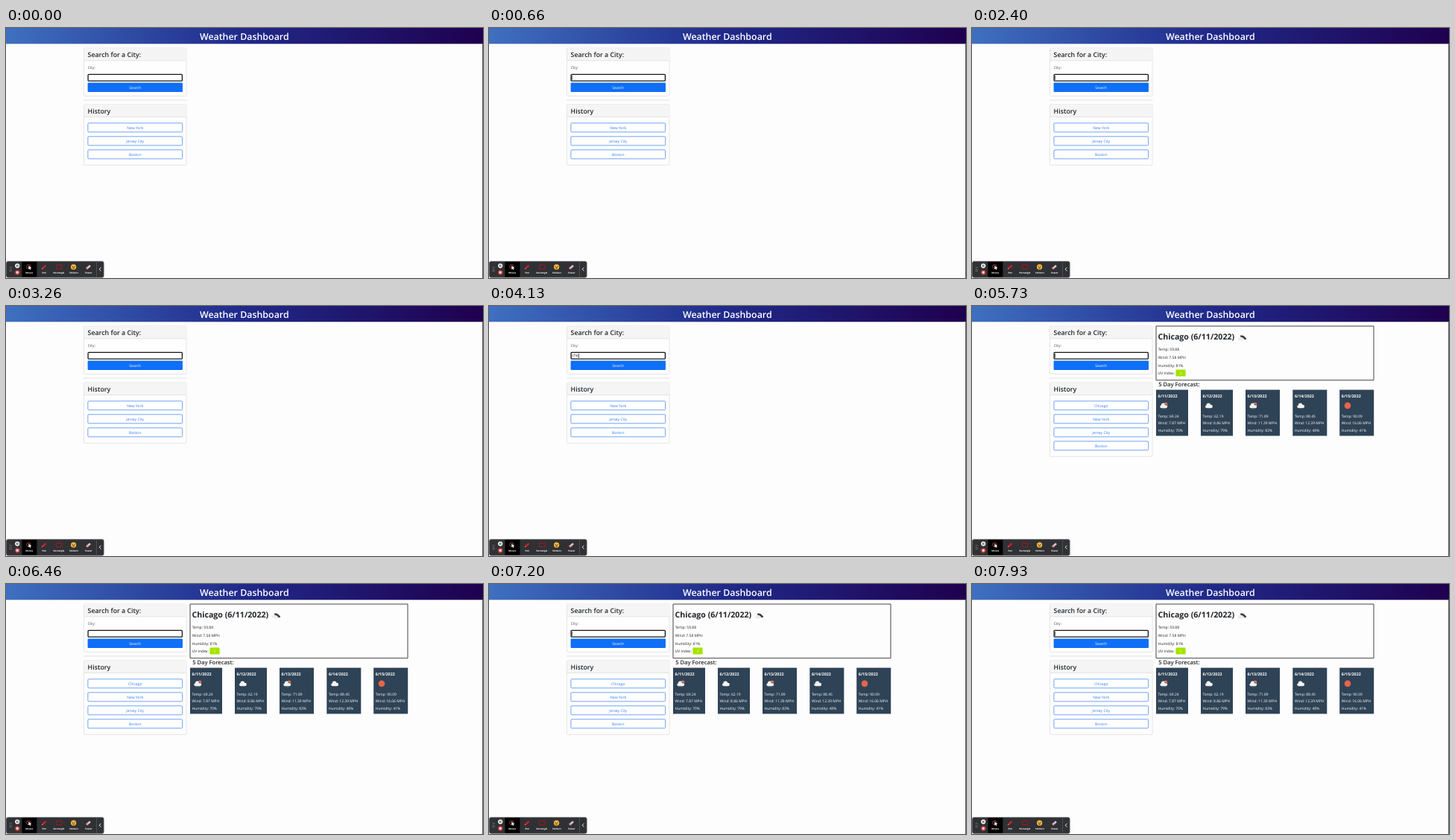
An HTML page with a canvas for the animation above (8 s loop, 640 by 336 pixels).

```html
<!DOCTYPE html>
<html lang="en">
<head>
<meta charset="utf-8">
<title>Weather Dashboard</title>
<style>
  html, body { margin: 0; width: 100%; height: 100%; overflow: hidden; background: #fdfdfd; }
  canvas { display: block; width: 640px; height: 336px; }
</style>
</head>
<body>
<canvas id="stage" width="640" height="336"></canvas>
<script>
const ctx = document.getElementById('stage').getContext('2d');
const LOOP = 8000;
const BLINK = 530;
const FONT = '"Open Sans", "Noto Sans", sans-serif';
const INK = '#212529';
const BLUE = '#0d6efd';

const WORD = 'chicago';
const KEY_TIMES = [3660, 3800, 3930, 4130, 4260, 4460, 4600];
const SUBMIT = 5260;
const RESULTS = 5600;

const CITIES = ['New York', 'Jersey City', 'Boston'];
const DAYS = [
  { x: 247, w: 43, date: '6/11/2022', icon: 'shower', temp: '69.24', wind: '7.87', hum: 70 },
  { x: 307, w: 43, date: '6/12/2022', icon: 'cloud', temp: '62.19', wind: '8.86', hum: 79 },
  { x: 367, w: 46, date: '6/13/2022', icon: 'shower', temp: '71.89', wind: '11.39', hum: 83 },
  { x: 430.3, w: 46, date: '6/14/2022', icon: 'cloud', temp: '88.45', wind: '12.39', hum: 48 },
  { x: 493.2, w: 46, date: '6/15/2022', icon: 'sun', temp: '90.09', wind: '16.06', hum: 41 }
];

function text(str, x, y, size, color = INK, weight = 400, align = 'left') {
  ctx.font = `${weight} ${size}px ${FONT}`;
  ctx.textAlign = align;
  ctx.fillStyle = color;
  ctx.fillText(str, x, y);
}

function box(x, y, w, h, r, fill, stroke, line = 1) {
  ctx.beginPath();
  ctx.roundRect(x, y, w, h, r);
  if (fill) {
    ctx.fillStyle = fill;
    ctx.fill();
  }
  if (stroke) {
    ctx.strokeStyle = stroke;
    ctx.lineWidth = line;
    ctx.stroke();
  }
}

function disc(x, y, r, fill) {
  ctx.beginPath();
  ctx.arc(x, y, r, 0, Math.PI * 2);
  ctx.fillStyle = fill;
  ctx.fill();
}

function path(points, color, width) {
  ctx.beginPath();
  points.forEach(([x, y]) => ctx.lineTo(x, y));
  ctx.strokeStyle = color;
  ctx.lineWidth = width;
  ctx.stroke();
}

function cloud(x, y, color) {
  disc(x - 2.8, y + 1.2, 2, color);
  disc(x - 0.5, y - 0.6, 2.8, color);
  disc(x + 2.8, y + 1, 2.2, color);
  box(x - 3, y, 6, 3.2, 1, color);
}

function header() {
  const g = ctx.createLinearGradient(0, 0, 640, 0);
  g.addColorStop(0, '#3f70c0');
  g.addColorStop(0.5, '#20298a');
  g.addColorStop(1, '#1f004e');
  ctx.fillStyle = g;
  ctx.fillRect(0, 0, 640, 21.3);
  text('Weather Dashboard', 319.8, 15.7, 12.4, '#fff', 600, 'center');
}

function card(y, h, title) {
  box(104.5, y, 137.5, h, 1.2, '#fefefe', '#dcdcdc', 0.7);
  ctx.fillStyle = '#f5f5f5';
  ctx.fillRect(105, y + 0.4, 136.6, 16.4);
  ctx.fillStyle = '#dcdcdc';
  ctx.fillRect(105, y + 16.5, 136.6, 0.7);
  text(title, 109.6, y + 11.7, 8.8, INK, 600);
}

function search(typed, caret) {
  card(27, 64.4, 'Search for a City:');
  text('City:', 109.7, 55.4, 5, '#40454a');
  box(110.1, 62.3, 126.3, 8.9, 1, '#fff', '#14171a', 1.3);
  text(typed, 111.3, 68.4, 5);
  if (caret) {
    ctx.fillStyle = '#222';
    ctx.fillRect(111.2 + ctx.measureText(typed).width, 63.8, 0.7, 6);
  }
  box(109.6, 73.5, 127.4, 12.4, 1.2, '#0f6ff6');
  text('Search', 173.2, 81.6, 5, '#fff', 400, 'center');
  ctx.fillStyle = '#d4d5d6';
  ctx.fillRect(104, 96.6, 138.5, 0.7);
}

function historyList(cities) {
  card(102.8, 27.5 + cities.length * 18, 'History');
  cities.forEach((city, i) => {
    const y = 127.8 + i * 18;
    box(109.9, y, 126.7, 12, 1.2, '#fff', '#4d8cf5', 0.8);
    text(city, 173.2, y + 7.9, 5, '#3577ee', 400, 'center');
  });
}

function nightCloud(x, y) {
  cloud(x - 0.8, y + 1, '#ececec');
  ctx.lineCap = 'round';
  path([[x - 1.2, y - 1.4], [x + 1.2, y - 0.8], [x + 4.2, y + 2]], '#3b3b3d', 2.5);
  ctx.lineCap = 'butt';
}

function icon(kind, x, y) {
  if (kind === 'sun') {
    disc(x, y + 0.3, 4.3, '#e4664a');
    return;
  }
  if (kind === 'shower') {
    disc(x + 2.2, y - 1.6, 2.4, '#e4664a');
    cloud(x - 0.6, y + 0.4, '#f1f1f1');
    path([[x + 0.6, y - 1.4], [x + 3.6, y - 0.4]], '#50565f', 1.1);
    for (let i = -1; i < 2; i++) path([[x + i * 2, y + 3.6], [x + i * 2 - 0.7, y + 5]], '#8f9aa5', 0.6);
    return;
  }
  cloud(x, y + 0.4, '#f3f3f3');
}

function current() {
  box(247, 27, 292, 72.7, 0, '#fdfdfd', '#454545', 1);
  text('Chicago (6/11/2022)', 249.4, 44.8, 10.65, INK, 700);
  nightCloud(362.5, 42);
  text('Temp: 59.88', 249.7, 60.2, 5);
  text('Wind: 7.58 MPH', 249.7, 70.9, 5);
  text('Humidity: 81%', 249.7, 81.5, 5);
  text('UV Index:', 249.7, 92.2, 5);
  box(273.4, 85.6, 13.2, 9, 1.2, '#a5e300');
  text('0', 280, 92, 4.6, '#e9f9b8', 400, 'center');
}

function forecast() {
  text('5 Day Forecast:', 250.2, 107.9, 7.6, INK, 600);
  for (const d of DAYS) {
    const x = d.x + 2.6;
    ctx.fillStyle = '#2f4356';
    ctx.fillRect(d.x, 112.6, d.w, 61.9);
    text(d.date, x, 122.5, 5.4, '#fff', 700);
    icon(d.icon, d.x + 10.8, 133.6);
    text(`Temp: ${d.temp}`, x, 150, 4.95, '#fff');
    text(`Wind: ${d.wind} MPH`, x, 159.3, 4.95, '#fff');
    text(`Humidity: ${d.hum}%`, x, 168.6, 4.95, '#fff');
  }
}

function toolbar() {
  box(0.5, 313.8, 130.6, 21.4, 2, '#303134', '#55575a', 0.8);
  for (let i = 0; i < 6; i++) disc(5.2 + (i % 2) * 1.8, 321.8 + (i >> 1) * 2.4, 0.55, '#a0a0a0');

  disc(15.2, 319.6, 3.1, '#f4f4f4');
  ctx.fillStyle = '#333';
  ctx.fillRect(14, 318.2, 0.8, 2.8);
  ctx.fillRect(15.6, 318.2, 0.8, 2.8);
  disc(15.2, 328.5, 3.1, '#dc4a4a');
  box(14, 327.3, 2.4, 2.4, 0.3, '#fff');

  ctx.fillStyle = '#000';
  ctx.fillRect(21.4, 314.2, 20, 20.4);
  ctx.beginPath();
  ctx.arc(30.4, 320.8, 2.7, 0, Math.PI * 2);
  ctx.strokeStyle = '#c95252';
  ctx.lineWidth = 0.8;
  ctx.stroke();
  ctx.beginPath();
  [[30.2, 319.6], [34.4, 322.4], [32.6, 322.8], [33.4, 324.8], [32.4, 325], [31.6, 323.2], [30.4, 324.4]]
    .forEach(([x, y]) => ctx.lineTo(x, y));
  ctx.fillStyle = '#fff';
  ctx.fill();

  path([[48.6, 323.4], [53.6, 319.2]], '#d0202c', 2.3);
  path([[48, 324], [49.2, 322.9]], '#f0a0a0', 1);
  box(67.6, 318.4, 7.2, 5.4, 0, null, '#b31620', 0.9);

  disc(90.6, 321.2, 3.6, '#f5bd3d');
  disc(89.2, 320.4, 0.65, '#5b3510');
  disc(92, 320.4, 0.65, '#5b3510');
  ctx.beginPath();
  ctx.arc(90.6, 321.7, 1.7, 0, Math.PI);
  ctx.fillStyle = '#8a3d1c';
  ctx.fill();

  path([[108.2, 323.4], [113, 319.2]], '#d8c6ca', 2.6);
  path([[108, 323.5], [109.7, 322]], '#ef8a93', 2.6);

  const labels = [['Mouse', 31.2], ['Pen', 51.2], ['Rectangle', 71], ['Stickers', 91], ['Eraser', 111]];
  for (const [name, x] of labels) text(name, x, 329.5, 3, '#fff', 700, 'center');

  ctx.fillStyle = '#5b5d60';
  ctx.fillRect(121.2, 314.4, 0.7, 20.2);
  path([[127.4, 321.8], [125.2, 324.2], [127.4, 326.6]], '#fff', 0.9);
}

// The caret restarts its blink with every key press.
function caretOn(t) {
  let start = 270;
  if (t >= 3460) start = 3460;
  for (const k of KEY_TIMES) if (t >= k) start = k;
  return t >= start && Math.floor((t - start) / BLINK) % 2 === 0;
}

function draw(t) {
  const count = KEY_TIMES.filter(k => t >= k).length;
  const typed = t < SUBMIT ? WORD.slice(0, count) : '';
  const done = t >= RESULTS;

  ctx.fillStyle = '#fdfdfd';
  ctx.fillRect(0, 0, 640, 336);
  header();
  ctx.fillStyle = '#4a4a4c';
  ctx.fillRect(639.1, 21.3, 0.9, 314.7);
  search(typed, caretOn(t));
  historyList(done ? ['Chicago', ...CITIES] : CITIES);
  if (done) {
    current();
    forecast();
  }
  toolbar();
}

ctx.textRendering = 'geometricPrecision';
const begin = performance.now();
function tick() {
  draw((performance.now() - begin) % LOOP);
  requestAnimationFrame(tick);
}
tick();
</script>
</body>
</html>
```
